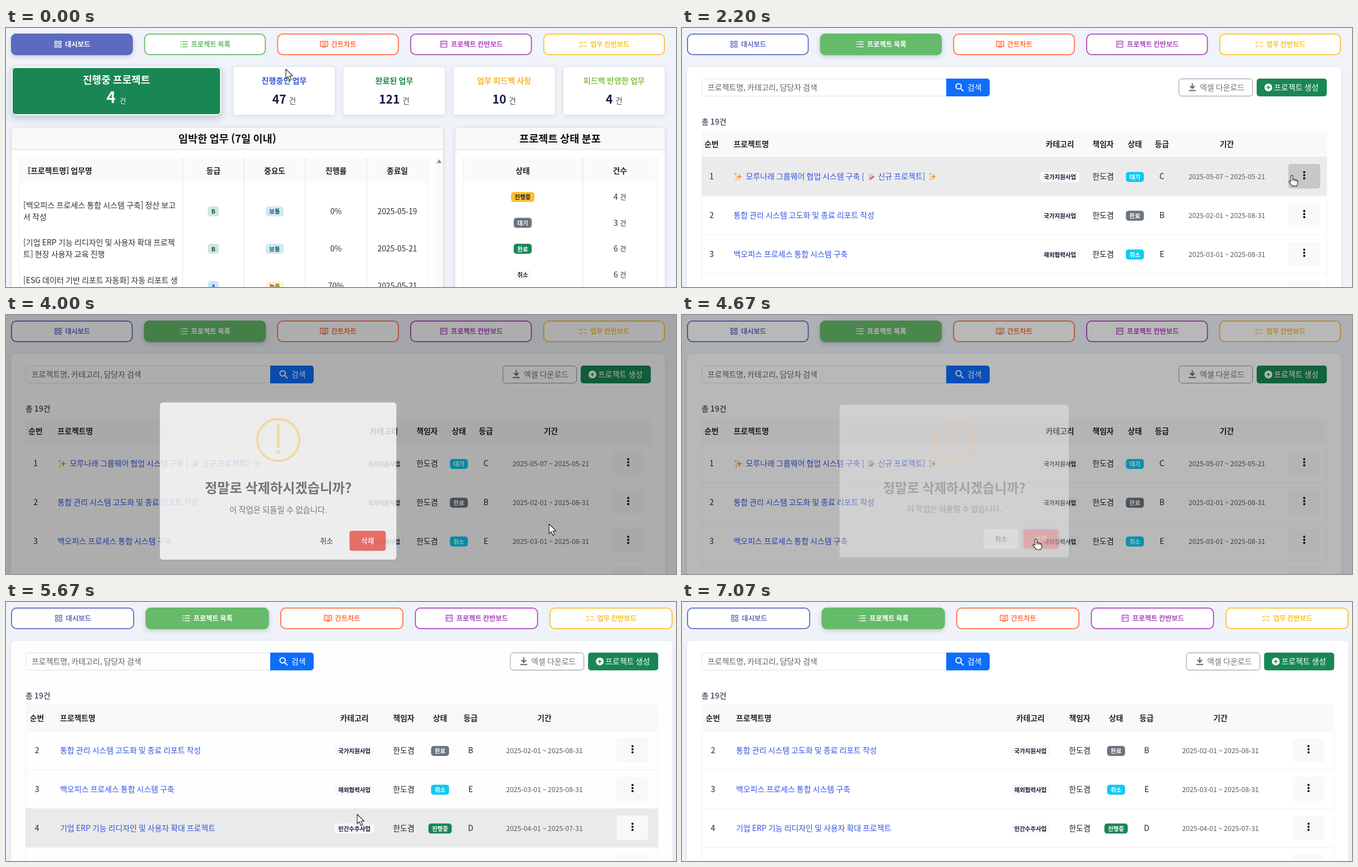
Recreate the animation shown at these times as an HTML page with a canvas. Size 1202 px wide and 466 px high, loop 7800 ms.

```html
<!DOCTYPE html>
<html lang="ko">
<head>
<meta charset="utf-8">
<style>
html, body { margin: 0; width: 100%; height: 100%; overflow: hidden; background: #f0f3f9; }
canvas { display: block; }
</style>
</head>
<body>
<canvas id="stage" width="1202" height="466"></canvas>
<script>
const g = document.getElementById('stage').getContext('2d');
const LOOP = 7800, TAU = Math.PI * 2, INK = '#212529';
const FAMILY = '"Noto Sans CJK KR", "Noto Sans KR", "Noto Sans CJK JP", "Noto Sans CJK", sans-serif';

// Moments of the story, in ms
const OPEN_LIST = 600, MENU = 2730, ASK = 3850, CONFIRM = 4610, DONE = 4690, REMOVED = 5135, CLOSE = 5400, GONE = 7070;

const clamp = x => Math.min(1, Math.max(0, x));
const ramp = (t, a, b) => clamp((t - a) / (b - a));
const mix = (a, b, k) => a + (b - a) * k;
const smooth = x => x * x * (3 - 2 * x);

// CSS "ease": cubic-bezier(.25, .1, .25, 1)
function ease(x) {
  x = clamp(x);
  let lo = 0, hi = 1, u = x;
  for (let i = 0; i < 20; i++) {
    u = (lo + hi) / 2;
    const v = 1 - u;
    if (.75 * v * v * u + .75 * v * u * u + u * u * u < x) lo = u; else hi = u;
  }
  return .3 * (1 - u) ** 2 * u + 3 * (1 - u) * u * u + u ** 3;
}

// ---- drawing helpers ----
function text(s, x, y, size, color, align = 'left', bold = false) {
  g.font = `${bold ? 700 : 400} ${size}px ${FAMILY}`;
  g.textAlign = align;
  g.fillStyle = color;
  g.fillText(s, x, y + size * .37);
}
const bold = (s, x, y, size, color, align = 'center') => text(s, x, y, size, color, align, true);

function box(x, y, w, h, r, fill, line, width = 1, shadow) {
  g.save();
  g.beginPath();
  g.roundRect(x, y, w, h, r);
  if (shadow) {
    g.shadowOffsetY = shadow[0];
    g.shadowBlur = shadow[1];
    g.shadowColor = `rgba(30,40,60,${shadow[2]})`;
  }
  if (fill) { g.fillStyle = fill; g.fill(); }
  g.shadowColor = 'transparent';
  if (line) {
    g.beginPath();
    g.roundRect(x + width / 2, y + width / 2, w - width, h - width, r);
    g.strokeStyle = line; g.lineWidth = width; g.stroke();
  }
  g.restore();
}
function rect(x, y, w, h, fill) { g.fillStyle = fill; g.fillRect(x, y, w, h); }
function dot(x, y, r, fill) { g.beginPath(); g.arc(x, y, r, 0, TAU); g.fillStyle = fill; g.fill(); }
function trace(path, x, y, color, width) {
  g.save();
  g.translate(x, y);
  g.strokeStyle = color; g.lineWidth = width;
  g.stroke(new Path2D(path));
  g.restore();
}
function badge(s, x, y, bg, fg = '#fff') {
  g.font = `700 10.5px ${FAMILY}`;
  const w = g.measureText(s).width + 13;
  box(x - w / 2, y - 9, w, 18, 5, bg);
  bold(s, x, y + .5, 10.5, fg);
}

// ---- navigation ----
const TABS = [
  ['대시보드', '#5c6bc0', 'M-5.5-5.2h4v4h-4zM1.5-5.2h4v4h-4zM-5.5 1.4h4v4h-4zM1.5 1.4h4v4h-4z'],
  ['프로젝트 목록', '#66bb6a', 'M-6.5-4.5h2M-6.5 0h2M-6.5 4.5h2M-3-4.5h9.5M-3 0h9.5M-3 4.5h9.5'],
  ['간트차트', '#ff7043', 'M-6.6-5.2h13.2v9h-13.2zM-3 5.3h6M-4.3-2.4h1.5M-1.8-2.4h6M-4.3.8h1.5M-1.8.8h6'],
  ['프로젝트 칸반보드', '#ab47bc', 'M-5.4-5.4h10.8v10.8h-10.8zM-2.7-3v6M0-3v3M2.7-3v4.5'],
  ['업무 칸반보드', '#fbc02d', 'M-6.5-3.2l1.8 1.8 3-3.2M-6.5 3l1.8 1.8 3-3.2M.5-2.8h6M.5 3.4h6'],
];
function nav(t, active, wide) {
  const pitch = wide ? 241.5 : 238.7, w = wide ? 221 : 218.4;
  const grow = ramp(t, 330, 480) - ramp(t, 1110, 1260);
  TABS.forEach(([label, color, icon], i) => {
    const c = 9 + pitch * i + w / 2, on = i === active;
    const fg = on ? '#fff' : color;
    g.save();
    if (i === 1) {
      const k = 1 + .03 * smooth(grow);
      g.translate(c, 29.2); g.scale(k, k); g.translate(-c, -29.2);
    }
    box(c - w / 2, 10, w, 38.8, 9, on ? color : '#fff', color, 1.8, on ? [3, 9, .2] : null);
    g.font = `700 12.25px ${FAMILY}`;
    const x = c - (g.measureText(label).width + 20.8) / 2;
    trace(icon, x + 8, 29.2, fg, 1.4);
    bold(label, x + 20.8, 29.2, 12.25, fg, 'left');
    g.restore();
  });
}

// ---- dashboard ----
const SOFT = [2, 8, .1], LINE = '#dee2e6';
function countCard(x, w, label, n, color) {
  const c = x + w / 2;
  box(x, 69, w, 88, 6, '#fff', LINE, 1, SOFT);
  bold(label, c, 95, 14.1, color);
  g.font = `700 21.2px ${FAMILY}`;
  const nw = g.measureText(n).width, left = c - (nw + 17.5) / 2;
  bold(n, left, 128.5, 21.2, '#141b3f', 'left');
  text('건', left + nw + 5, 131, 13.5, '#444a55');
}
function panel(x, w, title) {
  box(x, 178, w, 320, 6, '#fff', '#dcdfe4', 1, SOFT);
  box(x + 1, 179, w - 2, 40, [5, 5, 0, 0], '#f8f8f9');
  rect(x, 218, w, 1, '#d9dce1');
  bold(title, x + w / 2, 199, 18.7, '#111');
}
function grid(xs) {
  rect(xs[0], 233, xs[xs.length - 1] - xs[0], 45, '#f9fafb');
  xs.forEach((x, i) => rect(x, 233, 1, 233, i % (xs.length - 1) ? LINE : '#eceef1'));
}
const TASKS = [
  ['[백오피스 프로세스 통합 시스템 구축] 정산 보고', '서 작성', 'B', '보통', '0%', '2025-05-19'],
  ['[기업 ERP 기능 리디자인 및 사용자 확대 프로젝', '트] 현장 사용자 교육 진행', 'B', '보통', '0%', '2025-05-21'],
  ['[ESG 데이터 기반 리포트 자동화] 자동 리포트 생', '성', 'A', '높음', '70%', '2025-05-21'],
];
const TINT = { B: ['#d1e7dd', '#0f5132'], A: ['#cfe2ff', '#084298'], 보통: ['#cfebf2', '#12505f'], 높음: ['#fff3cd', '#664d03'] };
const STATES = [['진행중', 4, '#fbc02d', INK], ['대기', 3, '#6c757d'], ['완료', 6, '#198754'], ['취소', 6, '#f8f9fa', INK]];

function dashboard() {
  box(10, 70, 376, 87, 6, '#198754', '#fff', 2, [5, 14, .25]);
  bold('진행중 프로젝트', 198, 93, 18.1, '#fff');
  bold('4', 188.5, 125, 28, '#fff');
  text('건', 204, 131, 12.2, '#fff');
  countCard(407, 184, '진행중인 업무', '47', '#3056e0');
  countCard(604.5, 184, '완료된 업무', '121', '#1e8a4c');
  countCard(801.7, 184, '업무 피드백 사항', '10', '#f9b52c');
  countCard(999, 184, '피드백 반영한 업무', '4', '#8bc34a');

  panel(9, 776, '임박한 업무 (7일 이내)');
  grid([23.5, 316.5, 426.5, 536.5, 646.5, 756.5]);
  rect(770, 233, 14, 233, '#fafafa');
  g.fillStyle = '#85888c';
  g.fill(new Path2D('M773 243l4.2-6.5 4.2 6.5z'));
  bold('[프로젝트명] 업무명', 39, 257, 13.85, INK, 'left');
  ['등급', '중요도', '진행률', '종료일'].forEach((s, i) => bold(s, 372 + 110 * i, 257, 13.85, INK));
  TASKS.forEach(([a, b, grade, level, rate, end], i) => {
    const y = 329.5 + 67.2 * i;
    text(a, 31, y - 10.5, 14.02, '#2c3036');
    text(b, 31, y + 10.5, 14.02, '#2c3036');
    badge(grade, 372, y + .5, ...TINT[grade]);
    badge(level, 482, y + .5, ...TINT[level]);
    text(rate, 592, y, 13.85, '#2c3036', 'center');
    text(end, 702, y, 13.85, '#2c3036', 'center');
  });

  panel(805, 378, '프로젝트 상태 분포');
  grid([819.5, 1034.5, 1167.5]);
  bold('상태', 927, 257, 13.85, INK);
  bold('건수', 1101.5, 257, 13.85, INK);
  STATES.forEach(([s, n, bg, fg], i) => {
    const y = 304 + 46.6 * i;
    badge(s, 927, y, bg, fg);
    text(n, 1090, y, 13.95, '#2c3036');
    text('건', 1101.5, y + .5, 12.2, '#2c3036');
  });
}

// ---- project list ----
const COLS = [53, 92.5, 678, 755.5, 812.5, 861, 977.5, 1116.3];
const COLS_AFTER = [55.5, 97, 625, 713.5, 778.7, 833.5, 966, 1124];
const OWNER = '한도겸', CYAN = '#0dcaf0';
const ROWS = [
  [1, '', '국가지원사업', '대기', CYAN, 'C', '2025-05-07 ~ 2025-05-21'],
  [2, '통합 관리 시스템 고도화 및 종료 리포트 작성', '국가지원사업', '완료', '#6c757d', 'B', '2025-02-01 ~ 2025-08-31'],
  [3, '백오피스 프로세스 통합 시스템 구축', '해외협력사업', '취소', CYAN, 'E', '2025-03-01 ~ 2025-08-31'],
  [4, '기업 ERP 기능 리디자인 및 사용자 확대 프로젝트', '민간수주사업', '진행중', '#198754', 'D', '2025-04-01 ~ 2025-07-31'],
  [5, 'ESG 데이터 기반 리포트 자동화', '민간수주사업', '진행중', '#198754', 'A', '2025-04-01 ~ 2025-07-31'],
];
const LINK = '#3454e4';

function star(x, y, r) {
  g.beginPath();
  g.moveTo(x, y - r);
  for (let i = 1; i <= 4; i++) {
    const a = i * TAU / 4 - TAU / 4;
    g.quadraticCurveTo(x, y, x + r * Math.cos(a), y + r * Math.sin(a));
  }
  g.fillStyle = '#f2a03a';
  g.fill();
}
function sparkles(x, y) { star(x + 1.8, y + .5, 7); star(x - 4.5, y - 4, 3.5); star(x - 3.8, y + 5, 3.2); }
function memo(x, y) {
  box(x - 5.5, y - 6, 10.5, 12.5, 1, '#dfe4ea');
  trace('M-3.5-3h6M-3.5 0h5M-3.5 3h3', x, y, '#9aa5b1', 1);
  trace('M-2 4.5L5.5-1.5', x, y + 1, '#d8583f', 2.6);
}
function projectName(name, x, y) {
  if (name) return text(name, x, y, 13.95, LINK);
  sparkles(x + 8.5, y);
  text('모루나래 그룹웨어 협업 시스템 구축 [', x + 22, y, 13.95, LINK);
  memo(x + 246.5, y);
  text('신규 프로젝트]', x + 259, y, 13.95, LINK);
  sparkles(x + 357, y);
}
function row(r, y, c, right, hover, pressed) {
  const [no, name, kind, state, color, grade, dates] = r;
  if (hover) rect(35, y - 35, right - 35, 70, '#ebebeb');
  rect(35, y + 34.5, right - 35, 1, '#eff0f2');
  text(no, c[0], y, 13.95, INK, 'center');
  projectName(name, c[1], y);
  badge(kind, c[2], y + 1, '#f8f9fa', '#141b33');
  text(OWNER, c[3], y, 13.95, INK, 'center');
  badge(state, c[4], y + 1, color);
  text(grade, c[5], y, 13.95, INK, 'center');
  text(dates, c[6], y + .5, 12.2, '#555a61', 'center');
  box(c[7] - 28.3, y - 22, 56.5, 43.5, 4, pressed ? '#c6c7c8' : '#f8f9fa', pressed && '#bcbdbf');
  for (const d of [-7.5, -2, 3.5]) dot(c[7], y + d, 2, '#111');
}

function list(t, wide, hover) {
  const dx = wide ? 13.3 : 0, right = 1156.8 + dx;
  const removed = t >= REMOVED;
  const cols = removed ? COLS_AFTER.map(x => wide ? x : x * 1157 / 1170) : COLS;
  box(9, 70, 1173.5 + dx, 440, 7, '#fff', null, 1, [2, 9, .09]);

  box(35, 91, 440, 32, [5, 0, 0, 5], '#fff', LINE);
  text('프로젝트명, 카테고리, 담당자 검색', 46, 107, 13.95, '#5c636a');
  box(474, 91, 78, 32, [0, 5, 5, 0], '#0d6efd');
  trace('M4 0a4.8 4.8 0 1 1-9.6 0a4.8 4.8 0 1 1 9.6 0M2.8 3.6L8 8.8', 497, 105, '#fff', 2);
  text('검색', 512, 107, 13.95, '#fff');

  box(891 + dx, 91, 133, 32, 5, '#fff', '#8b9299');
  trace('M0-7v8.5M-4.2-2.2L0 2L4.2-2.2M-6.2 6h12.4', 915.5 + dx, 106.5, '#5f676e', 2);
  text('엑셀 다운로드', 929 + dx, 107, 13.95, '#6c757d');
  box(1031 + dx, 91, 125.8, 32, 5, '#198754');
  dot(1052 + dx, 107, 7, '#fff');
  trace('M-3.5 0h7M0-3.5v7', 1052 + dx, 107, '#198754', 1.6);
  text('프로젝트 생성', 1062 + dx, 107, 13.95, '#fff');

  bold('총 19건', 35, 168.5, 13.8, '#5a6270', 'left');
  rect(35, 185, right - 35, 47, '#f8f9fa');
  rect(35, 231.5, right - 35, 1, '#eff0f2');
  rect(34.5, 232, 1, 234, '#f1f2f4');
  rect(right - .5, 232, 1, 234, '#f1f2f4');
  ['순번', '프로젝트명', '카테고리', '책임자', '상태', '등급', '기간'].forEach((s, i) =>
    bold(s, cols[i], 209, 13.8, INK, i === 1 ? 'left' : 'center'));

  const menu = t >= MENU && t < ASK;
  ROWS.slice(removed ? 1 : 0).slice(0, 4).forEach((r, i) => {
    g.save();
    if (r[0] === 1) g.globalAlpha = .5 + Math.cos(Math.PI * ramp(t, 4735, REMOVED)) / 2;
    row(r, 267 + 69.8 * i, cols, right, hover === i, i === 0 && t > 2150 && t < ASK);
    g.restore();
  });
  if (menu) dropdown(cursorAt(t));
}

function dropdown([, cy]) {
  box(1006.5, 291, 137.5, 104, 6, '#fff', '#c6c9cd', 1, [2, 5, .12]);
  [['상세보기', 311], ['수정', 336], ['삭제', 375]].forEach(([s, y]) => {
    const on = Math.abs(cy - y) < 12.3;
    if (on) rect(1007.5, y - 12.3, 135.5, 24.6, '#aaccf5');
    text(s, 1020.5, y, 12.2, on ? '#4660dc' : INK);
  });
  rect(1007.5, 355, 135.5, 1, '#d5d8db');
}

// ---- dialog ----
// Strength of a fade that takes d ms
function shown(t, d) {
  if (t < CONFIRM) return ease((t - ASK) / d);
  if (t < DONE) return 1 - ease((t - CONFIRM) / d);
  if (t < CLOSE) return mix(1 - ease((DONE - CONFIRM) / d), 1, ease((t - DONE) / d));
  return 1 - ease((t - CLOSE) / d);
}
function bounce(u) {
  if (u < .45) return mix(.5, 1.05, ease(u / .45));
  if (u < .8) return mix(1.05, .95, ease((u - .45) / .35));
  return mix(.95, 1, ease((u - .8) / .2));
}
function ring(a, b, color) {
  g.beginPath();
  g.arc(488.5, 227, 36.5, a * TAU / 360, b * TAU / 360);
  g.strokeStyle = color; g.lineWidth = 3.5;
  g.stroke();
}
function button(s, x, w, bg, fg, focus) {
  if (focus) {
    box(x - 2.5, 383, w + 5, 40, 6, 'rgba(43,114,165,.29)');
    box(x - 1, 384.5, w + 2, 37, 5, '#fff');
  }
  box(x, 385.5, w, 35, 4, bg);
  bold(s, x + w / 2, 403, 12.2, fg);
}
function segment(x, y, x2, y2, a, b) {
  if (b <= a) return;
  g.beginPath();
  g.moveTo(mix(x, x2, a), mix(y, y2, a));
  g.lineTo(mix(x, x2, b), mix(y, y2, b));
  g.stroke();
}
function success(u) {
  const GREEN = '#a5dc86';
  ring(0, 360, 'rgba(165,220,134,.2)');
  const turn = 360 * clamp((u - 212) / 298) ** 1.42;
  if (turn > 0 && turn < 360) turn < 180 ? ring(62 - turn, 62, GREEN) : ring(-118, 242 - turn, GREEN);
  g.strokeStyle = GREEN; g.lineWidth = 4.4; g.lineCap = 'round';
  segment(470, 229, 483, 242, 0, ramp(u, 405, 560));
  segment(483, 242, 509, 214, 0, ramp(u, 530, 690));
  g.lineCap = 'butt';
}
function dialog(t) {
  if (t < ASK || t > CLOSE + 300) return;
  const done = t >= DONE, u = t - (done ? DONE : ASK);
  const veil = shown(t, 300), k = bounce(clamp(u / 300));
  rect(0, 0, 1202, 466, `rgba(0,0,0,${.4 * veil})`);

  // Drawn on a layer of its own so that it fades as one piece
  const main = g.canvas, layer = g.getTransform();
  g.save();
  g.globalAlpha = veil * shown(t, 200);
  g.translate(488.3, 299); g.scale(k, k); g.translate(-488.3, -299);
  box(282.5, 161.5, 411.5, 274.5, 5, '#fff');
  const title = done ? '삭제 완료' : '정말로 삭제하시겠습니까?';
  const note = done ? '프로젝트가 삭제되었습니다.' : '이 작업은 되돌릴 수 없습니다.';
  if (done) {
    success(u);
  } else {
    const pulse = Math.abs(u / 750 % 2 - 1), color = `rgb(248,${mix(187, 212, pulse)},134)`;
    ring(0, 360, color);
    box(486.3, 200, 4.4, 41, 2, color);
    dot(488.5, 248, 3, color);
  }
  bold(title, 488.5, 311, 23.55, 'rgba(0,0,0,.65)');
  text(note, 488.5, 349, 13.95, 'rgba(0,0,0,.64)', 'center');
  if (done) {
    button('OK', 617, 60, '#7cd1f9', '#fff', true);
  } else {
    button('취소', 541, 63, '#efefef', '#555', false);
    button('삭제', 612.5, 63, '#e64942', '#fff', t > 4500);
  }
  g.restore();
}

// ---- pointer ----
const PATH = [
  [70, 502, 74], [480, 359, 28], [1070, 359, 28], [1870, 1015, 282], [2270, 1101, 264], [2470, 1118, 266],
  [2760, 1118, 266], [3470, 1028, 372], [3850, 1028, 372], [4500, 635, 403], [4720, 635, 403], [5070, 640, 382],
  [5400, 640, 382], [5600, 630, 382], [5930, 630, 382], [6300, 560, 412], [6670, 400, 345], [6900, 200, 285], [7060, 32, 300],
];
function cursorAt(t) {
  let i = PATH.findIndex(p => p[0] > t);
  if (i < 0) i = PATH.length - 1;
  const b = PATH[i], a = PATH[Math.max(0, i - 1)];
  const k = smooth(a === b ? 0 : ramp(t, a[0], b[0]));
  return [mix(a[1], b[1], k), mix(a[2], b[2], k)];
}
const ARROW = new Path2D('M0 0V17.2L4 13.5L6.8 20.3L9.7 19L6.9 12.4L12.4 12.2Z');
const HAND = new Path2D('M-1.8 1Q0-1 1.8 1V7Q4 5.5 5 7.5Q7 6.5 8 8.6Q10 8 10.5 10V13Q10.5 16 8.5 19H.5Q-2 15-5.5 11.5Q-5 8.5-1.8 11Z');
const HAND_TIMES = [[420, 1120], [2200, 2840], [4420, 4860]];
function pointer(t) {
  if (t >= GONE) return;
  const hand = HAND_TIMES.some(([a, b]) => t >= a && t < b);
  g.save();
  g.translate(...cursorAt(t));
  g.fillStyle = '#fff'; g.strokeStyle = '#1b1b1b'; g.lineWidth = 1.1; g.lineJoin = 'round';
  g.fill(hand ? HAND : ARROW);
  g.stroke(hand ? HAND : ARROW);
  if (hand) g.stroke(new Path2D('M1.8 7v3M5 7.5v3M8 8.6v2.5'));
  g.restore();
}
function hoveredRow(t) {
  if (t >= MENU && t < ASK) return 0;
  const [x, y] = cursorAt(t);
  if (t >= ASK && t < CLOSE || t >= GONE || x < 35 || y < 232) return -1;
  return Math.floor((y - 232) / 69.8);
}

function draw(t) {
  const onList = t >= OPEN_LIST, wide = t >= CLOSE;
  rect(0, 0, 1202, 466, '#f0f3f9');
  nav(t, onList ? 1 : 0, wide);
  if (onList) list(t, wide, hoveredRow(t)); else dashboard();
  dialog(t);
  pointer(t);
}
const start = performance.now();
function tick() {
  draw((performance.now() - start) % LOOP);
  requestAnimationFrame(tick);
}
tick();
</script>
</body>
</html>
```
